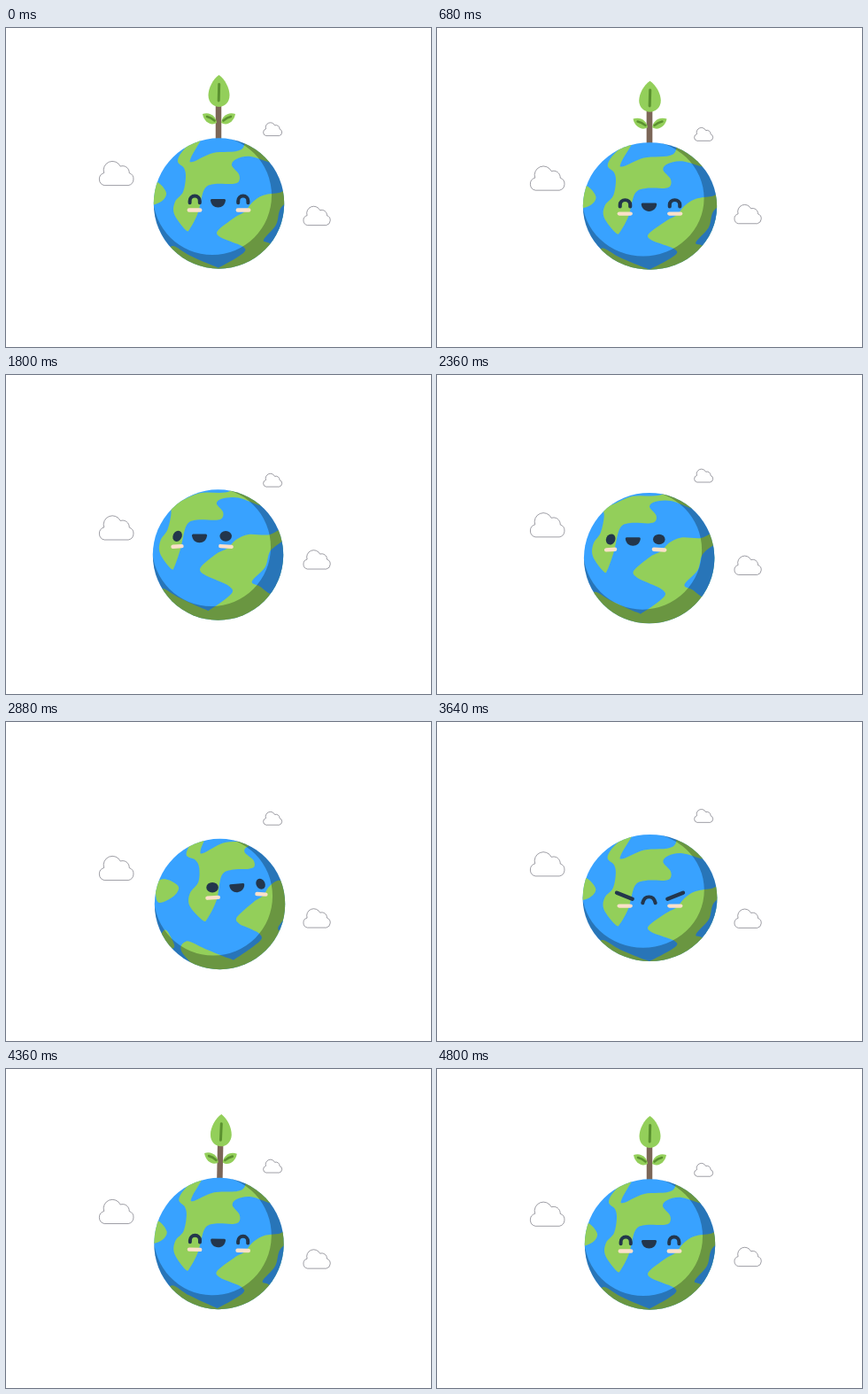
These frames come from a looping animation (480x360 px, 4.84 s). An HTML page with a canvas:

```html
<!DOCTYPE html>
<html lang="en">
<head>
<meta charset="utf-8">
<title>Happy planet</title>
<style>
  html, body { margin: 0; width: 100%; height: 100%; overflow: hidden; background: #fff; }
  canvas { display: block; }
</style>
</head>
<body>
<canvas id="stage" width="480" height="360"></canvas>
<script>
const ctx = document.getElementById('stage').getContext('2d');
const LOOP = 4840, R = 73.7, TAU = Math.PI * 2;
const BLUE = '#38a2ff', GREEN = '#93cf5a', VEIN = '#5b9130', INK = '#23364c', BLUSH = '#fbe0c9';

// Land outlines on the resting globe, centred at 240.5, 198
const AMERICA = [224,118, 209,146, 211,151, 234,141, 266,137, 276,114, 318,130, 318,152, 300,152,
  276,145, 260,148, 255,155, 263,165, 263,173, 256,176, 236,176, 224,182, 217,208, 208,226, 203,228,
  190,210, 191,196, 200,185, 203,168, 201,158, 194,150, 202,136];
const AFRICA = [239,229, 258,214, 270,207, 278,197, 290,189, 308,186, 340,182, 340,300, 240,310,
  186,262, 188,246, 208,257, 236,269, 243,269, 268,254, 268,247, 254,241, 242,236];
const GULF = [338,190, 312,201, 305,222, 291,239, 298,243, 314,252, 338,242];
const ISLAND = [160,178, 171,174, 181,186, 175,196, 160,199];
const WEST = [165,231, 172,240, 174,252, 155,250];

// Tracks: time, then values
const BODY = [ // height on the stage, stretch
  [0, 198, 1], [460, 198, 1], [640, 206, .94], [800, 175, 1.15], [940, 222, .88], [1080, 199.5, .983],
  [1240, 200, 1], [1460, 201, 1], [1740, 203, 1], [2500, 207, 1], [2880, 205.5, 1], [3480, 199, 1],
  [3640, 198.5, .971], [3860, 229, .9], [3960, 221, .93], [4080, 178, 1.19], [4240, 203, .96],
  [4400, 196, 1.015], [4600, 198, 1], [LOOP, 198, 1]];
const LOOK = [ // sideways, downwards
  [0, 0, 0], [640, 0, 3], [800, 0, -6], [1000, 0, 6], [1460, 0, 0], [1740, -20, -18.5],
  [2280, -20, -18.5], [2800, 20.5, -18], [3220, 20.5, -18], [3480, 0, 0], [3860, 0, 5],
  [4080, 0, -8], [4400, 0, 0], [LOOP, 0, 0]];
const TILT = [[0, 0], [3960, 0], [4080, 10], [4240, -4], [4400, 2], [4560, 0], [LOOP, 0]];
const PLANT = [[0, 1], [800, 1], [940, 0], [3960, 0], [4080, 1], [LOOP, 1]];
const DRIFT = [[0, 201], [1550, 196.5], [3260, 212.5], [LOOP, 201]];

const rad = deg => deg * Math.PI / 180;
const wave = (t, delay) => Math.sin((t - delay) / LOOP * TAU);

// Eased values between two neighbouring keys
function sample(keys, t) {
  const i = keys.findIndex(k => k[0] > t), a = keys[i - 1], b = keys[i];
  const u = (t - a[0]) / (b[0] - a[0]), e = u * u * (3 - 2 * u);
  return a.slice(1).map((v, n) => v + (b[n + 1] - v) * e);
}

function fill(path, color, rule = 'nonzero') {
  ctx.fillStyle = color;
  ctx.fill(typeof path === 'string' ? new Path2D(path) : path, rule);
}

function stroke(d, color, width) {
  ctx.strokeStyle = color;
  ctx.lineWidth = width;
  ctx.stroke(new Path2D(d));
}

function at(x, y, angle, draw) {
  ctx.save();
  ctx.translate(x, y);
  ctx.rotate(angle);
  draw();
  ctx.restore();
}

function ellipse(x, y, rx, ry = rx, angle = 0) {
  const p = new Path2D();
  p.ellipse(x, y, rx, ry, angle, 0, TAU);
  return p;
}

// Turns the surface: the middle moves most, the rim least
function turner(lookX, lookY, roll) {
  const c = Math.cos(rad(roll)), s = Math.sin(rad(roll));
  return (x, y) => {
    const k = 1 - .5 * Math.min(1, (x * x + y * y) / (R * R));
    return [x * c - y * s + lookX * k, x * s + y * c + lookY * k];
  };
}

// Smooth closed curve through the turned points
function outline(coords, turn) {
  const n = coords.length / 2, path = new Path2D();
  const pt = i => {
    const j = (i + n) % n * 2;
    return turn(coords[j] - 240.5, coords[j + 1] - 198);
  };
  path.moveTo(...pt(0));
  for (let i = 0; i < n; i++) {
    const [a, b, c, d] = [pt(i - 1), pt(i), pt(i + 1), pt(i + 2)];
    path.bezierCurveTo(b[0] + (c[0] - a[0]) / 6, b[1] + (c[1] - a[1]) / 6,
      c[0] - (d[0] - b[0]) / 6, c[1] - (d[1] - b[1]) / 6, ...c);
  }
  return path;
}

function cloud(x, y, size) {
  at(x, y, 0, () => {
    ctx.scale(size, size);
    stroke('M8 27H35A7.3 7.3 0 0 0 36 13A7.5 7.5 0 0 0 26 5.5A10 10 0 0 0 7.5 13A7.2 7.2 0 0 0 8 27Z',
      '#5d5d68', .6 / size);
  });
}

function plant(grown) {
  at(0, (1 - grown) * 86, 0, () => {
    stroke('M-.5 -112V-66', '#7c6657', 6.5);
    ctx.lineCap = 'round';
    fill('M0 -145C7 -140 12 -130 12 -122S6 -109 0 -109S-12 -114 -12 -122S-7 -140 0 -145Z', GREEN);
    stroke('M.2 -134.5L-.3 -116', VEIN, 3);
    for (const side of [-1, 1]) {
      ctx.save();
      ctx.scale(side, 1);
      fill('M2.5 -91C3 -98 10 -104 18.5 -101C17 -92 9 -87 2.5 -91Z', GREEN);
      stroke('M5 -93.5Q9 -97 13.5 -98', VEIN, 2.6);
      ctx.restore();
    }
  });
}

function eye(mood, x, side) {
  if (mood === 'happy') stroke('M-5.6 3.2V1.2A5.6 5.6 0 0 1 5.6 1.2V3.2', INK, 4);
  else if (mood === 'angry') stroke(`M${side * 9} -3.8L${-side * 8} 3.4`, INK, 4.4);
  else {
    const edge = Math.max(0, Math.abs(x) - 20) / 24;
    fill(ellipse(0, 0, 6.8 - 1.7 * edge, 5.8 + .4 * edge, -Math.sign(x) * rad(25 * edge)), INK);
  }
}

function face(mood, turn, roll) {
  ctx.lineCap = 'round';
  for (const side of [-1, 1]) {
    const [x, y] = turn(side * 27.3, -4), [bx, by] = turn(side * 27.5, 7.5);
    const half = Math.abs(bx) > 35 ? 5 : 6.2;
    at(x, y, 0, () => eye(mood, x, side));
    at(bx, by, mood === 'open' ? rad(side * 3.5) : 0, () => stroke(`M${-half} 0H${half}`, BLUSH, 4.4));
  }
  at(...turn(-1, -4), rad(roll), () => {
    if (mood === 'angry') stroke('M-7 8C-5 -1.5 5 -1.5 7 8', INK, 4);
    else fill('M-7.2 -1H7.2Q8.6 -1 8.5 .6C8 5.6 4.4 8.6 0 8.6S-8 5.6 -8.5 .6Q-8.6 -1 -7.2 -1Z', INK);
  });
}

function planet(t) {
  const [y, stretch] = sample(BODY, t), [lookX, lookY] = sample(LOOK, t);
  const roll = -.2 * Math.max(0, lookX), turn = turner(lookX, lookY, roll);
  const mood = t < 1560 || t >= 3980 ? 'happy' : t < 3360 ? 'open' : 'angry';
  const disc = ellipse(0, 0, R);
  at(240.5 + lookX / 20, y, rad(sample(TILT, t)[0]), () => {
    ctx.scale(1 / stretch, stretch);
    plant(sample(PLANT, t)[0]);
    fill(disc, BLUE);
    ctx.save();
    ctx.clip(disc);
    for (const land of [AMERICA, AFRICA, ISLAND, WEST]) fill(outline(land, turn), GREEN);
    fill(outline(GULF, turn), BLUE);
    // Darken everything outside the lit circle
    const shade = ellipse(-7.5, -9, 67);
    shade.rect(-90, -90, 180, 180);
    fill(shade, 'rgba(0,0,0,.28)', 'evenodd');
    ctx.restore();
    face(mood, turn, roll);
  });
}

function frame(now) {
  const t = now % LOOP;
  ctx.clearRect(0, 0, 480, 360);
  cloud(103.2, 153 + 6.5 * wave(t, 290), 1);
  cloud(289.4, 106.3 + 7.7 * wave(t, -60), .545);
  cloud(334.2, sample(DRIFT, t)[0] + .4, .785);
  planet(t);
  requestAnimationFrame(frame);
}
requestAnimationFrame(frame);
</script>
</body>
</html>
```
